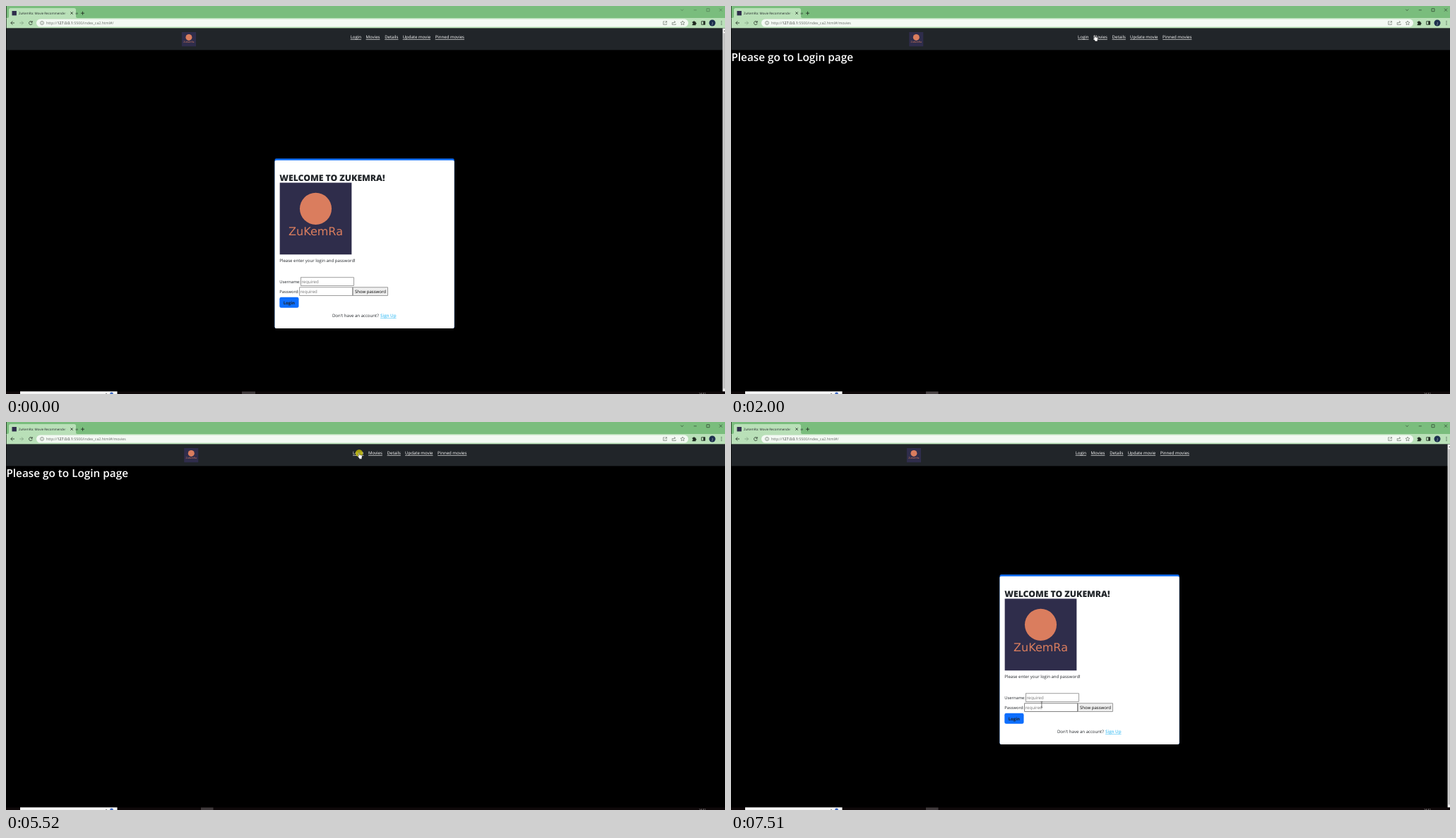
Recreate the animation shown at these times as an HTML page. Size 1018 px wide and 550 px high, loop 8000 ms.

```html
<!DOCTYPE html>
<html lang="en">
<head>
<meta charset="utf-8">
<title>Movie site</title>
<style>
  html, body { margin: 0; width: 100%; height: 100%; overflow: hidden; background: #000; }
  svg { display: block; width: 100vw; height: 100vh; }
  text { font-family: "Open Sans", "Noto Sans", sans-serif; font-size: 6.05px; fill: #212529; text-rendering: geometricPrecision; white-space: pre; }
  .nav text { fill: #fff; text-decoration: underline; }
  .icon { fill: none; stroke: #1f2a20; stroke-width: .8; }
  .soft { stroke: #5b665c; stroke-width: .6; }
  .field { fill: #fff; stroke: #767676; stroke-width: .7; }
  .hint { fill: #757575; }
</style>
</head>
<body>
<svg viewBox="0 0 1018 550" preserveAspectRatio="none">
  <defs>
    <linearGradient id="fade" gradientUnits="userSpaceOnUse" x1="80" x2="89" y1="0" y2="0">
      <stop offset="0" stop-color="#b9e0b8" stop-opacity="0"/>
      <stop offset="1" stop-color="#b9e0b8"/>
    </linearGradient>
    <symbol id="badge" viewBox="0 0 102 102">
      <rect width="102" height="102" fill="#2f2d4b"/>
      <circle cx="51" cy="37" r="22.5" fill="#da7d5e"/>
      <text x="51" y="75" text-anchor="middle" style="font:16px 'DejaVu Sans',sans-serif;fill:#da7d5e">ZuKemRa</text>
    </symbol>
  </defs>
  <rect width="1018" height="550"/>

  <!-- browser bars -->
  <rect x=".6" width="1017.4" height="18" fill="#7abd7d"/>
  <rect x=".6" y="17" width="1017.4" height="14.6" fill="#b9e0b8"/>
  <path d="M2 17q2 0 2-2V5.500q0-2.500 2.500-2.500h90q2.500 0 2.500 2.500V15q0 2 2 2z" fill="#b9e0b8"/>
  <rect x="8.500" y="7" width="6.400" height="6.400" fill="#2f2d4b"/>
  <text x="18" y="11.700" style="font-size:4.500px">ZuKemRa: Movie Recommender - Home</text>
  <rect x="79" y="5" width="19.500" height="10" fill="#b9e0b8" mask="none" style="fill:url(#fade)"/>
  <path class="icon" d="M91.400 8.400l3.400 3.400m0-3.400l-3.400 3.400M106 10.200h5m-2.500-2.500v5"/>
  <g id="controls" class="icon" style="stroke-width:.6">
    <path d="M955.300 4.700l1.900 1.900 1.900-1.900M973.800 5.800h4M992 3.700h4v4h-4zM1010 3.600l4 4m0-4l-4 4"/>
  </g>
  <path class="icon" d="M12 24H6.800m2.500-2.500L6.800 24l2.500 2.500M36.800 22.600a2.400 2.400 0 1 0 .4 2.200M37.200 21.200v2h-2"/>
  <path class="icon" style="stroke:#7f9d80" d="M19.300 24h5.200m-2.500-2.500l2.500 2.500-2.500 2.500"/>
  <rect x="43" y="18.600" width="923" height="11" rx="5.500" fill="#f3f9f3"/>
  <circle class="icon soft" cx="51" cy="24" r="2.500"/>
  <path class="icon soft" d="M51 23.700v1.600M51 22.400v.6"/>
  <text x="57" y="25.900" style="font-size:5.270px;fill:#666c67">http://<tspan fill="#1d1f1d">127.0.0.1</tspan>:5500/index_ca2.html#/<tspan id="route"></tspan></text>
  <path class="icon soft" d="M932.500 21.800h-1.800v4.600h4.600v-1.800M933.500 21.700h2v2m0-2l-3 3M944.500 23.500h-1.300v3h5v-1.500M944.500 25q.3-2.300 2.800-2.300m-1.300-1.400l1.800 1.400-1.800 1.500"/>
  <path class="icon soft" d="M958 21l.9 2 2.100.2-1.600 1.400.5 2.200-1.900-1.200-1.900 1.200.5-2.200-1.600-1.400 2.100-.2z"/>
  <path d="M971.700 22.300h1.400a1 1 0 0 1 2 0h1.500v1.500a1 1 0 0 1 0 2v1.400h-4.900v-1.500a1 1 0 0 0 0-2z" fill="#1f2a20"/>
  <path class="icon" d="M984.700 21.700h5v4.600h-5z"/>
  <path d="M987.300 21.700h2.400v4.600h-2.400z" fill="#1f2a20"/>
  <circle cx="1000" cy="24" r="4.500" fill="#1c2f4d"/>
  <text x="1000" y="25.700" text-anchor="middle" style="font-size:4.600px;fill:#fff">J</text>
  <path d="M1012.500 21.300h1v1h-1zm0 2.200h1v1h-1zm0 2.200h1v1h-1z" fill="#1f2a20"/>

  <!-- site navigation -->
  <rect x=".6" y="31.600" width="1017.400" height="30.800" fill="#212529"/>
  <g id="nav" class="nav">
    <use href="#badge" x="248.700" y="37" width="20.400" height="20.400"/>
    <text x="487.700" y="46.300">Login</text>
    <text x="509.600" y="46.300">Movies</text>
    <text x="536.200" y="46.300">Details</text>
    <text x="561.700" y="46.300">Update movie</text>
    <text x="607.700" y="46.300">Pinned movies</text>
  </g>

  <text id="notice" x=".4" y="78.300" style="font-size:15.300px;font-weight:600;fill:#fff"></text>

  <!-- sign-in page -->
  <g id="login">
    <rect x="1014.600" y="31.600" width="3.400" height="515" fill="#f1f1f1"/>
    <rect x="1015.400" y="38.400" width="2.600" height="504" fill="#c1c1c1"/>
    <path d="M1016.400 36l1.600-1.800v1.800z" fill="#505050"/>
    <rect x="380.500" y="216.300" width="254.200" height="240.600" rx="2.200" fill="#0d6efd"/>
    <path d="M380.500 220.400q0-1.700 2-1.700h250.200q2 0 2 1.700v234.300q0 2.200-2.200 2.200H382.700q-2.200 0-2.200-2.200z" fill="#fff"/>
    <text x="387.300" y="248" style="font-size:12.200px;font-weight:800">WELCOME TO ZUKEMRA!</text>
    <use href="#badge" x="387.400" y="250.300" width="102.200" height="102.200"/>
    <text x="387.300" y="362.900">Please enter your login and password!</text>
    <text x="387.300" y="392.900" style="font-size:5.800px">Username:</text>
    <rect class="field" x="417.400" y="384.800" width="75.200" height="11.800"/>
    <text class="hint" x="418.500" y="392.900">required</text>
    <text x="387.300" y="406.900" style="font-size:5.800px">Password:</text>
    <rect id="pass" class="field" x="415.700" y="398.800" width="75" height="11.800"/>
    <text class="hint" x="416.700" y="406.900">required</text>
    <rect class="field" x="491.200" y="398.800" width="49.400" height="11.800" style="fill:#efefef"/>
    <text x="493.900" y="406.900" style="fill:#000">Show password</text>
    <rect x="387.300" y="412.800" width="27.200" height="15" rx="2.400" fill="#0d6efd"/>
    <text x="400.900" y="422.600" text-anchor="middle" style="font-weight:700">Login</text>
    <text x="461.900" y="441.100" style="font-size:6.100px">Don't have an account?</text>
    <text x="530" y="441.100" style="font-size:6.200px;font-weight:600;fill:#4cc3f5;text-decoration:underline">Sign Up</text>
  </g>

  <!-- taskbar -->
  <rect y="546.500" width="1018" height="3.500" fill="#0f090a"/>
  <rect x="20" y="546.300" width="137.500" height="3.700" fill="#f6f6f6"/>
  <circle cx="149.500" cy="549.800" r="2.300" fill="#3f6bc4"/>
  <path d="M141 550l1-1.200 1 1.200z" fill="#555"/>
  <rect id="task" y="546.500" height="3.500"/>
  <text x="981" y="551.300" style="font-size:3.800px;fill:#ddd">14:32</text>

  <!-- pointer -->
  <circle id="click" cx="500" cy="44.200" r="5.200" fill="#d6cf00" opacity=".72"/>
  <g id="pointer" stroke="#000" stroke-width=".4" stroke-linejoin="round">
    <path id="hand" fill="#fff" d="M1.500 5.200V.9a.7.700 0 0 1 1.400 0V3.300l2.700.5q1 .2 1 1.200L6.100 7.500V9.300H2.400V8.200L.3 5.600q-.2-1 .7-.9z"/>
    <path id="arrow" fill="#fff" d="M.2.2V6.200L1.500 5 2.500 7.400 3.500 7 2.500 4.700H4.300z"/>
    <path id="beam" fill="none" style="stroke:#222;stroke-width:.6" d="M-1.300-4H-.4L0-3.600.4-4H1.300M0-3.600V3.600M-1.300 4H-.4L0 3.600.4 4H1.300"/>
  </g>
</svg>
<script>
  const LOOP = 8000;
  const el = id => document.getElementById(id);
  const show = (id, on) => el(id).style.display = on ? "" : "none";

  // start time, pointer shape, x, y
  const moves = [
    [0, "", 0, 0],
    [500, "hand", 555.5, 41.3],
    [990, "hand", 493.4, 47.3],
    [1490, "hand", 515.3, 45],
    [2000, "hand", 512.8, 40.7],
    [2500, "hand", 546, 42],
    [2990, "hand", 571.2, 42],
    [3510, "hand", 600.2, 42],
    [4010, "hand", 618.2, 41.5],
    [4510, "hand", 532.5, 40.2],
    [5010, "hand", 507.3, 42],
    [5520, "hand", 497.7, 43.3],
    [6030, "arrow", 350.8, 45.8],
    [6510, "hand", 254.3, 49.5],
    [7020, "arrow", 422.3, 361.2],
    [7510, "beam", 439.9, 400.6]
  ];

  // start time, route, notice (empty on the sign-in page)
  const pages = [
    [0, "", ""],
    [2000, "movies", "Please go to Login page"],
    [2990, "details", "Please go to Login Page"],
    [3510, "update", "Please go to login page"],
    [4010, "pin", "Please go to login page"],
    [5010, "movies", "Please go to Login page"],
    [6030, "", ""]
  ];

  const at = (list, t) => list.filter(row => row[0] <= t).pop();

  function draw(t) {
    const [, shape, x, y] = at(moves, t);
    const [, route, notice] = at(pages, t);
    const active = t >= 2000;

    el("route").textContent = route;
    el("notice").textContent = notice;
    show("login", !notice);
    el("nav").setAttribute("transform", `translate(${notice ? 3.4 : 0} 0)`);
    el("controls").setAttribute("opacity", active ? 1 : .5);
    el("pass").style.stroke = shape === "beam" ? "#4f4f4f" : "";

    const task = el("task");
    task.setAttribute("x", active ? 276 : 334);
    task.setAttribute("width", active ? 17.5 : 19);
    task.setAttribute("fill", active && t < 2500 ? "#4a4446" : "#3f393b");

    for (const id of ["hand", "arrow", "beam"]) show(id, id === shape);
    el("pointer").setAttribute("transform", `translate(${x} ${y})`);
    show("click", t >= 5520 && t < 6030);
  }

  function tick(now) {
    draw(now % LOOP);
    requestAnimationFrame(tick);
  }
  draw(0);
  requestAnimationFrame(tick);
</script>
</body>
</html>
```
